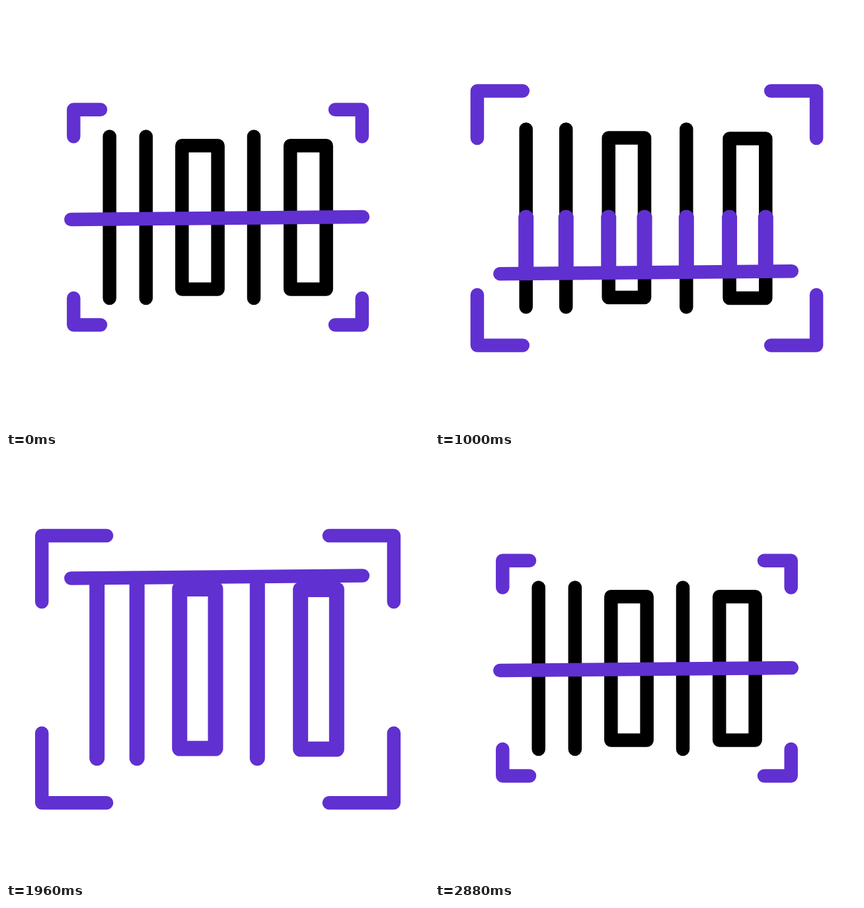
These frames come from a looping animation (640x640 px, 3 s). An HTML page with a canvas:

```html
<!DOCTYPE html>
<html lang="en">
<head>
<meta charset="utf-8">
<title>Scanning</title>
<style>
  html, body { margin: 0; width: 100%; height: 100%; overflow: hidden; background: #fff; }
  canvas { display: block; }
</style>
</head>
<body>
<canvas id="stage" width="640" height="640"></canvas>
<script>
const ctx = document.getElementById("stage").getContext("2d");
const LOOP = 3000, BLACK = "#000", PURPLE = "#6130d1";
const MIDDLE = 320, REACH = 139.5, THIN = 20.5, THICK = 23;

// left, top, tip x, upper tip y, bottom, lower tip y
const CORNERS = {
  small: [102.3, 156.8, 143, 197.5, 482.6, 442],
  wide: [63.9, 128.5, 132.8, 200, 513.4, 437],
  full: [53.8, 118.6, 153, 220.2, 523.6, 416.8]
};
// three bar positions, bar top and bottom, then left, right, top, bottom of each box
const BARS = {
  small: [156.7, 211.8, 375, 197.5, 442, 266.3, 320.6, 211.2, 428.5, 430.2, 484.6, 211.2, 428.5],
  wide: [137.7, 198.2, 380.3, 186.5, 455.5, 262.7, 317, 199.6, 441.1, 445.6, 500.3, 200.4, 442]
};

// eased progress of t from start to end
function ease(t, start, end) {
  const u = Math.min(1, Math.max(0, (t - start) / (end - start)));
  return u * u * (3 - 2 * u);
}
const mix = (a, b, p) => a.map((v, i) => v + (b[i] - v) * p);

function stroke(points, color, width, closed) {
  ctx.beginPath();
  points.forEach(([x, y]) => ctx.lineTo(x, y));
  if (closed) ctx.closePath();
  ctx.strokeStyle = color;
  ctx.lineWidth = width;
  ctx.stroke();
}

function drawBars(shape, color, width, lowerHalf) {
  const [x1, x2, x3, top, bottom, ...boxes] = shape;
  for (const x of [x1, x2, x3]) stroke([[x, lowerHalf ? MIDDLE : top], [x, bottom]], color, width);
  for (const i of [0, 4]) {
    const [l, r, t, b] = boxes.slice(i, i + 4);
    const y = lowerHalf ? MIDDLE : t;
    stroke([[l, y], [l, b], [r, b], [r, y]], color, width, !lowerHalf);
  }
}

function drawCorners([left, top, tipX, upperTip, bottom, lowerTip]) {
  for (const side of [x => x, x => 641 - x])
    for (const [y, tipY] of [[top, upperTip], [bottom, lowerTip]])
      stroke([[side(tipX), y], [side(left), y], [side(left), tipY]], PURPLE, THIN);
}

function drawScanned(t, lineY) {
  if (t < 640 || t > 2430) return;
  const lowerHalf = t < 1300 || lineY > MIDDLE && t < 1700;
  ctx.save();
  ctx.beginPath();
  if (t < 1300) ctx.rect(0, 0, 640, lineY);
  else if (lowerHalf) ctx.rect(0, 0, 640, 640);
  else ctx.rect(0, lineY, 640, 640);
  ctx.clip();
  drawBars(BARS.wide, PURPLE, THICK, lowerHalf);
  ctx.restore();
}

function draw(t) {
  ctx.fillStyle = "#fff";
  ctx.fillRect(0, 0, 640, 640);
  ctx.lineCap = ctx.lineJoin = "round";

  let corners = mix(CORNERS.small, CORNERS.wide, ease(t, 133, 567));
  corners = mix(corners, CORNERS.full, ease(t, 1630, 2008));
  corners = mix(corners, CORNERS.small, ease(t, 2232, 2667));
  const barsOpen = ease(t, 333, 752) - ease(t, 2433, 2867);
  const shift = REACH * (ease(t, 640, 1285) - 2 * ease(t, 1320, 1740)
    + 2 * ease(t, 2004, 2437) - ease(t, 2437, 2867));

  drawBars(mix(BARS.small, BARS.wide, barsOpen), BLACK, THIN);
  drawScanned(t, 321 + shift);
  stroke([[98.3, 323 + shift], [539.8, 319 + shift]], PURPLE, THIN);
  drawCorners(corners);
}

function tick() {
  draw(performance.now() % LOOP);
  requestAnimationFrame(tick);
}
tick();
</script>
</body>
</html>
```
